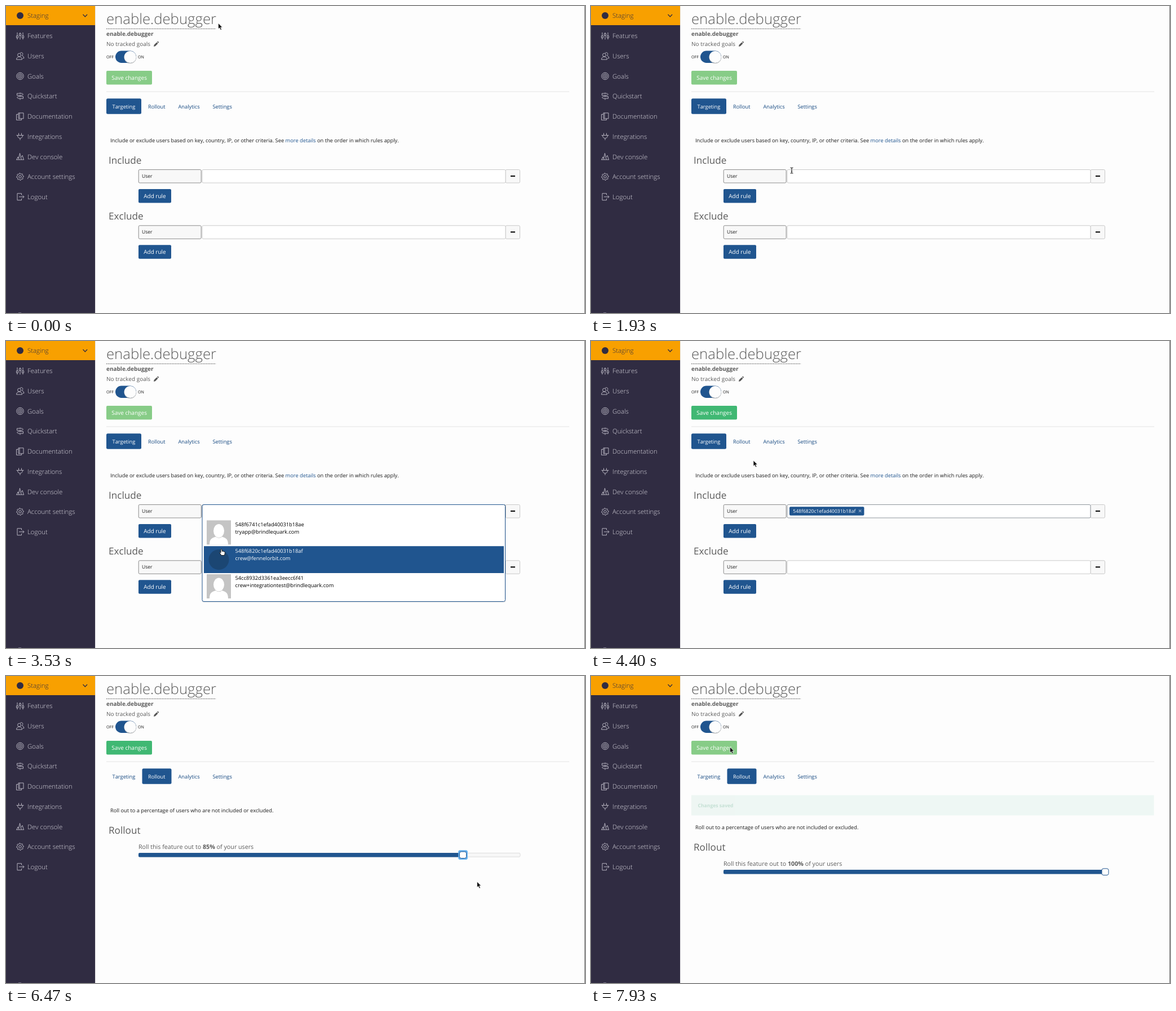
An HTML page that plays this animation: 1027x545 px, repeating every 8000 ms.

```html
<!DOCTYPE html>
<html lang="en">
<head>
<meta charset="utf-8">
<title>Feature flag settings</title>
<style>
  html, body { margin: 0; width: 100%; height: 100%; overflow: hidden; background: #fdfdfd; }
  svg { display: block; width: 100%; height: 100%; }
  text {
    font-family: "Open Sans", "Noto Sans", sans-serif; white-space: pre;
    font-kerning: none; font-variant-ligatures: none; text-rendering: geometricPrecision;
  }
</style>
</head>
<body>
<svg viewBox="0 0 1027 545">
  <g id="chrome"></g>
  <g id="view"></g>
</svg>
<script>
const LOOP = 8000, FRAME = 1000 / 15;
const BLUE = '#20558f', NAVY = '#302c42', GREY = '#5c5c5c', INK = '#1c1c1c';

const rect = (x, y, w, h, fill, extra = '') =>
  `<rect x="${x}" y="${y}" width="${w}" height="${h}" fill="${fill}" ${extra}/>`;
const box = (x, y, w, h, fill, stroke, r = 2) =>
  rect(x, y, w, h, fill, `stroke="${stroke}" rx="${r}"`);
const text = (x, y, size, fill, content, weight = 400) =>
  `<text x="${x}" y="${y}" font-size="${size}" fill="${fill}" font-weight="${weight}">${content}</text>`;
const line = (d, stroke, width = 1, extra = '') =>
  `<path d="${d}" fill="none" stroke="${stroke}" stroke-width="${width}" ${extra}/>`;
const circle = (x, y, r, fill, extra = '') =>
  `<circle cx="${x}" cy="${y}" r="${r}" fill="${fill}" ${extra}/>`;
const ring = (y, r, x = 25) => `M${x - r} ${y}a${r} ${r} 0 1 0 ${2 * r} 0a${r} ${r} 0 1 0 ${-2 * r} 0`;

// Menu icons are drawn around (25, 0).
const gear = Array.from({ length: 32 }, (_, i) => {
  const r = (i + 1) % 4 < 2 ? 6.3 : 4.9, a = i * Math.PI / 16;
  return `${i ? 'L' : 'M'}${(25 + r * Math.cos(a)).toFixed(1)} ${(r * Math.sin(a)).toFixed(1)}`;
}).join('') + 'z';
const menu = [
  ['Features', 'M20-6v6M20 3.5v3M25-6v2M25-.5v7M30-6v6M30 3.5v3M18.5 0h3v3.5h-3zM23.5-4h3v3.5h-3zM28.5 0h3v3.5h-3z'],
  ['Users', ring(-1.8, 2.9, 23.5) + 'M18.5 6.3c0-6.5 10-6.5 10 0zM25-5c2-2.500 5.500-.5 4.700 2.200-.3 1.200-1 1.800-1.700 2.100 2.500.5 3.800 2 3.800 4.700h-2.300'],
  ['Goals', ring(0, 6.2) + ring(0, 3.9) + ring(0, 1.6)],
  ['Quickstart', 'M25-6.5v1.5M25-1.5v2M25 4v2.5M19.5-5h9l2 1.7-2 1.8h-9zM30.5 .5h-9l-2 1.7 2 1.8h9z'],
  ['Documentation', 'M22-6h9v10h-9zM22-3.5h-3.5v10h9V4M24-6v10'],
  ['Integrations', 'M22.5-6v4M27.5-6v4M18.5-2h13M20.5-2c0 7 9 7 9 0M25 3.5v3'],
  ['Dev console', 'M18 5.5h14M19 5.5l2.2-5 2.2 5M22.5 3.5L24.5-6l2.8 11.5M27 1l2-3 2.5 7.5'],
  ['Account settings', gear + ring(0, 2.3)],
  ['Logout', 'M27.5-3v-3H20V6h7.5V3M23 0h9M29.5-2.5L32 0l-2.5 2.5']
];

const sidebar = () =>
  rect(0, 0, 158, 545, NAVY) + rect(0, 0, 158, 34, '#f8a000') +
  circle(25, 17, 6, NAVY) + text(38, 21.3, 11.43, NAVY, 'Staging', 300) +
  line('M136.500 15l3.800 4 3.800-4', NAVY, 1.3) +
  menu.map(([label, icon], i) => {
    const y = 53 + i * 35.72;
    return `<g transform="translate(0 ${y})">${line(icon, '#c4c2cd', .9)}</g>` +
      text(38, y + 4.2, 11.43, '#d8d6de', label, 300);
  }).join('') +
  line('M22 544.500h5', '#77748a') + rect(158, 0, 1, 545, '#e6e6e9');

const header = () =>
  text(178, 32, 25.71, GREY, 'enable.debugger', 300) +
  line('M178 40.500H372.500', '#444', 1.2, 'stroke-dasharray="1.500 1.400"') +
  text(178, 53, 10, GREY, 'enable.debugger', 700) +
  text(178, 71, 10, GREY, 'No tracked goals') +
  `<path d="M262 72l.7-3 4.600-4.600 2.200 2.200-4.600 4.600zM268 63.700l.8-.7q.6-.4 1.200.1l.8.8q.5.600 0 1.200l-.7.7z" fill="#555"/>` +
  text(178, 93.2, 7.14, INK, 'OFF') + text(234, 93.2, 7.14, INK, 'ON') +
  rect(194, 79.5, 37, 21.5, BLUE, 'rx="10.7"') +
  circle(220.300, 91.300, 11, '#999', 'opacity=".6"') + circle(220.300, 90.500, 10.600, '#fdfdfd') +
  line('M178 152H999', '#e4e4e4') + line('M1026.500 0V545', '#777');

document.getElementById('chrome').innerHTML = sidebar() + header();

const button = (x, y, w, fill, label) =>
  rect(x, y, w, 24.5, fill, 'rx="2"') + text(x + 9.2, y + 15.8, 10, '#fff', label);

const tabs = active =>
  [['Targeting', 178, 62], ['Rollout', 241.5, 52], ['Analytics', 295, 60], ['Settings', 356, 56]]
    .map(([label, x, w]) => (label === active ? rect(x, 164.3, w, 27.5, BLUE, 'rx="2.5"') : '') +
      text(x + 10.5, 181.5, 9.28, label === active ? '#fff' : '#174a82', label)).join('');

const rule = (title, y, stroke = '#cacaca') =>
  text(182, y - 22, 17.14, GREY, title) +
  box(886, y - 11.5, 25.5, 23.5, '#f8f8f8', '#c8c8c8') +
  box(348, y - 11.5, 538, 23.5, '#fff', stroke) +
  box(235.2, y - 11.5, 111, 23.5, '#f8f8f8', '#8c8c8c') +
  text(241, y + 3, 8.57, INK, 'User') +
  line(`M895 ${y}h8`, '#111', 2.2) +
  button(235, y + 23, 58, BLUE, 'Add rule');

const chip = () =>
  rect(352, 294.3, 132.5, 15.4, BLUE, 'rx="2"') +
  text(358.3, 305.1, 8.57, '#fff', '548f6820c1efad40031b18af') +
  line('M475 299.500l4.400 4.400M479.400 299.500l-4.400 4.400', '#8fa9c6', 1.3);

const people = [
  ['548f6741c1efad40031b18ae', 'tryapp@brindlequark.com'],
  ['548f6820c1efad40031b18af', 'crew@fennelorbit.com'],
  ['54cc8932d3361ea3eecc6f41', 'crew+integrationtest@brindlequark.com']
];
const silhouette = y =>
  rect(356, y, 43, 43, '#c4c4c4') +
  `<path d="M361 ${y + 43}c0-11 5-12 11-14 4 3 8 3 11 0 6 2 11 3 11 14z" fill="#fff"/>` +
  `<ellipse cx="377.500" cy="${y + 18.5}" rx="9.500" ry="12" fill="#fff"/>`;

const dropdown = active =>
  rect(347.5, 292, 539, 172, '#000', 'opacity=".1" rx="3"') +
  box(348, 290.5, 537.5, 172, '#fff', BLUE, 3) +
  people.map(([key, mail], i) => {
    const y = 316.4 + i * 47.8, on = i === active, ink = on ? '#fff' : '#000';
    return (on ? rect(351, y, 532, 47.8, BLUE) : '') +
      (i === 1 ? circle(377.5, y + 24, 18, on ? '#1b4673' : '#315f92') : silhouette(y + 2)) +
      text(406.5, y + 12.2, 9.28, ink, key) + text(406.5, y + 25.2, 9.28, ink, mail);
  }).join('');

const targeting = t => {
  const picked = t >= 3720, open = t >= 2790 && !picked;
  return text(185, 241.6, 9.28, INK,
      `Include or exclude users based on key, country, IP, or other criteria. See <tspan fill="${BLUE}">more details</tspan> on the order in which rules apply.`) +
    rule('Include', 302, t >= 2650 ? '#8e959c' : undefined) + rule('Exclude', 401.3) +
    (picked ? chip() : '') + (open ? dropdown(t < 3100 ? 0 : 1) : '');
};

const rollout = (percent, focused) => {
  const x = 235.5 + 6.765 * percent;
  return text(185, 241.6, 9.28, INK, 'Roll out to a percentage of users who are not included or excluded.') +
    text(182, 280, 17.14, GREY, 'Rollout') +
    text(235, 306.5, 10.71, GREY, `Roll this feature out to <tspan font-weight="700">${percent}%</tspan> of your users`) +
    box(235.5, 314.3, 676.5, 6.8, '#f7f7f7', '#dcdcdc') +
    rect(235, 314, x - 235, 7.5, BLUE, 'rx="2"') +
    (focused ? rect(x - 8.3, 309.3, 16.6, 16.6, '#62aeed', 'rx="3"') : '') +
    box(x - 6, 311.9, 12, 11.6, '#fff', BLUE, 3);
};

const banner = opacity =>
  `<g opacity="${opacity}">${rect(178, 211.5, 820.5, 36, '#dcefe8')}
   ${text(189.5, 233, 8.57, '#7fbda2', 'Changes saved', 700)}</g>`;

// Pointer stops: time, x, y and the shape used from then on.
const stops = [
  [0, 376.5, 30.5, 'arrow'], [350, 376.5, 30.5, 'arrow'], [1500, 366, 270, 'arrow'], [1800, 357, 292, 'beam'],
  [1930, 356, 292, 'beam'], [2600, 362, 302, 'beam'], [2900, 364, 306, 'hand'], [3400, 383.5, 375, 'hand'],
  [3730, 383.5, 375, 'hand'], [3800, 380, 368, 'arrow'], [4400, 288, 212, 'arrow'], [4620, 268, 180, 'hand'],
  [4870, 268, 180, 'hand'], [4950, 272, 195, 'arrow'], [5200, 320, 294, 'arrow'], [5470, 243, 306, 'arrow'],
  [5670, 243, 306, 'arrow'], [6300, 790, 368, 'arrow'], [6470, 835.5, 365, 'arrow'], [6780, 936, 364, 'arrow'],
  [6880, 936, 362, 'arrow'], [7270, 244, 123, 'hand'], [7600, 246, 125, 'arrow'], [8000, 246.5, 126, 'arrow']
];
const pointerAt = t => {
  const i = Math.max(1, stops.findIndex(s => s[0] > t));
  const [t0, x0, y0, shape] = stops[i - 1], [t1, x1, y1] = stops[i];
  const p = (t - t0) / (t1 - t0), ease = p * p * (3 - 2 * p);
  return { x: x0 + (x1 - x0) * ease, y: y0 + (y1 - y0) * ease, shape };
};
const shapes = {
  arrow: '<path d="M0 0v10.300l2.300-2.100 1.800 3.900 1.900-.9-1.800-3.700h3.200z" fill="#111" stroke="#fff" stroke-width=".7"/>',
  beam: line('M-2.500-5q2 0 2.500 1 .500-1 2.500-1M0-4v8M-2.500 5q2 0 2.500-1 .500 1 2.500 1M-1.200 1.500h2.400', '#222', 1.1),
  hand: '<path d="M-2.500-5c1.500-1.200 2 0 2 1l.3 2.500c1-.8 1.700-.3 2 .3 1-.5 1.600 0 1.800.6 1.200-.3 1.400.5 1.300 1.500L4 5.500h-5.500L-4.500 1c-.4-1 .7-1.500 2 0z" fill="#fff" stroke="#111" stroke-width=".9"/>'
};

const percentAt = t => {
  if (t < 5670) return 0;
  const share = (pointerAt(Math.min(t, 6850)).x - 10 - 235.5) / 676.5;
  return Math.min(100, Math.max(0, Math.round(share * 20) * 5));
};

const render = t => {
  const onRollout = t >= 4790, saved = t >= 7840, canSave = t >= 3720 && t < 7580;
  const { x, y, shape } = pointerAt(t);
  const panel = onRollout ? rollout(percentAt(t), t >= 5670 && t < 7390) : targeting(t);
  return button(178, 115, 81, canSave ? '#40b873' : '#87cc87', 'Save changes') +
    tabs(onRollout ? 'Rollout' : 'Targeting') +
    (saved ? banner((t - 7800) / 300) : '') +
    `<g transform="translate(0 ${saved ? 30 : 0})">${panel}</g>` +
    `<g transform="translate(${x} ${y})">${shapes[shape]}</g>`;
};

const view = document.getElementById('view');
let shown = -1;
const tick = () => {
  const frame = Math.floor((performance.now() % LOOP) / FRAME + .1) % 120;
  if (frame !== shown) view.innerHTML = render((shown = frame) * FRAME);
  requestAnimationFrame(tick);
};
tick();
</script>
</body>
</html>
```
